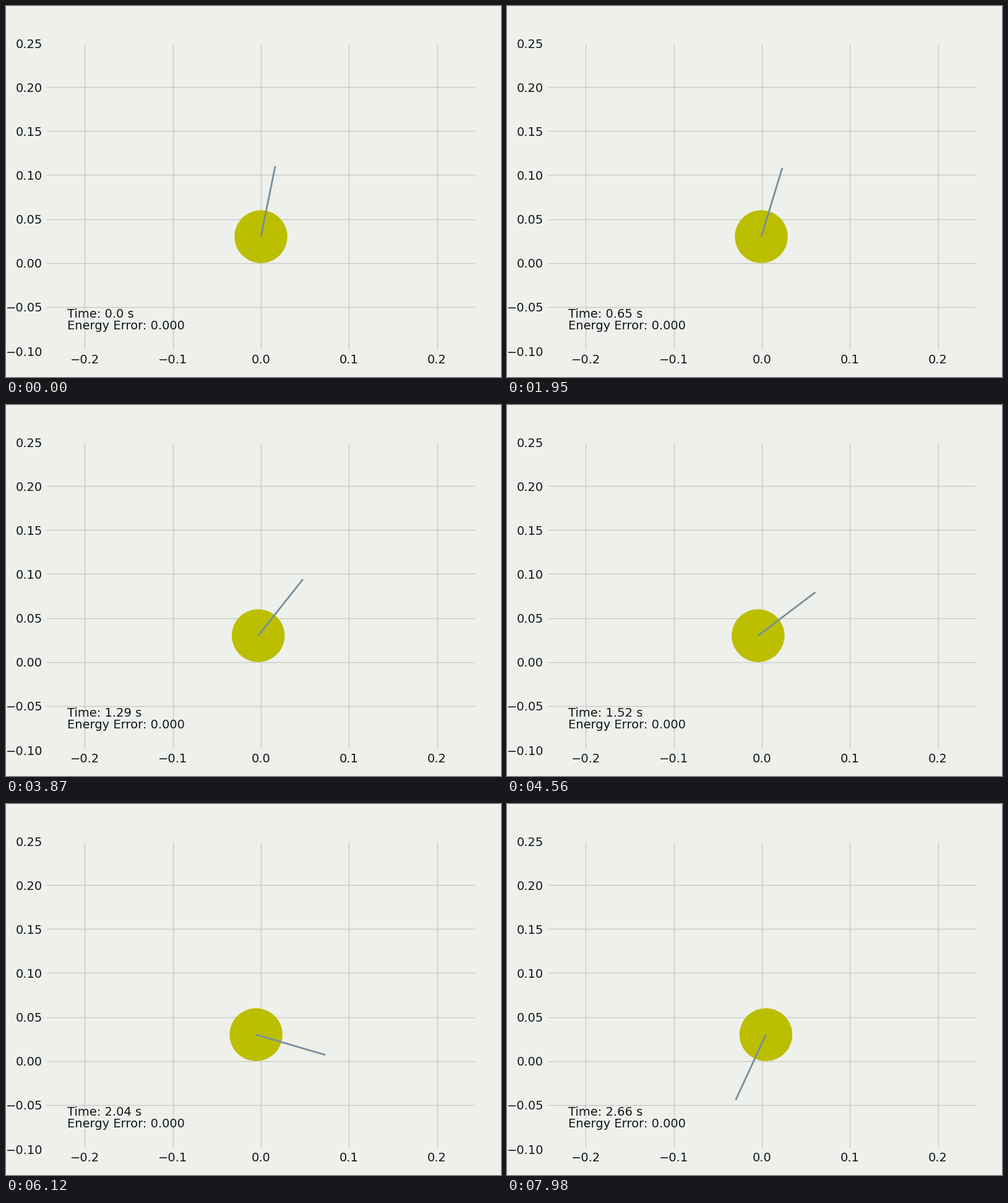
Write a matplotlib script that moves like this. It is 800 by 600 pixels and loops after 8 s.

```python
import numpy as np
import matplotlib.pyplot as plt
from matplotlib.animation import FuncAnimation

FRAMES = 267
LOOP_MS = 8000
DT = 0.01            # simulated seconds per frame
RADIUS = 0.03        # wheel radius
ROD = 0.0818         # rod length
RECOIL = 0.0073      # how far the wheel shifts against the rod
RATE = 1.478         # natural frequency of the rod, 1/s
START = 0.2          # initial tilt from vertical, rad

BG = '#eef0eb'
GRID = '#c8cac4'
INK = '#0f1519'
WHEEL = '#bcbe00'
STICK = '#778f9b'


def accel(angle):
    return RATE ** 2 * np.sin(angle)


def simulate(steps):
    """Angles of the falling rod, released at rest (velocity Verlet)."""
    sub = 10
    h = DT / sub
    angle, speed = START, 0.0
    angles = [angle]
    for _ in range(steps - 1):
        for _ in range(sub):
            speed += accel(angle) * h / 2
            angle += speed * h
            speed += accel(angle) * h / 2
        angles.append(angle)
    return np.array(angles)


angles = simulate(FRAMES)

plt.rcParams['font.family'] = 'DejaVu Sans'
plt.rcParams['font.size'] = 14

fig = plt.figure(figsize=(8, 6), dpi=100, facecolor=BG)
ax = fig.add_axes([0.08, 0.07, 0.87, 0.83], facecolor=BG)
half = 0.35 * 696 / 498 / 2
ax.set_xlim(-half, half)
ax.set_ylim(-0.10, 0.25)
ax.set_xticks(np.arange(-2, 3) / 10)
ax.set_yticks(np.arange(-2, 6) / 20)
ax.xaxis.set_major_formatter('{x:.1f}')
ax.yaxis.set_major_formatter('{x:.2f}')
ax.set_axisbelow(True)
ax.grid(True, color=GRID, linewidth=1)
ax.tick_params(length=0, pad=3.5, labelsize=14, labelcolor=INK)
for spine in ax.spines.values():
    spine.set_color(BG)
    spine.set_linewidth(3)

wheel = plt.Circle((0, RADIUS), RADIUS, facecolor=WHEEL, edgecolor='none')
ax.add_patch(wheel)
rod, = ax.plot([], [], color=STICK, linewidth=2, solid_capstyle='butt')
clock = ax.text(0.05, 54 / 498, '', color=INK, transform=ax.transAxes)
ax.text(0.05, 35 / 498, 'Energy Error: 0.000', color=INK,
        transform=ax.transAxes)


def draw(i):
    angle = angles[max(i - 1, 0)]    # the picture lags the clock by a step
    x = -RECOIL * (np.sin(angle) - np.sin(START))
    wheel.center = (x, RADIUS)
    rod.set_data([x, x + ROD * np.sin(angle)],
                 [RADIUS, RADIUS + ROD * np.cos(angle)])
    clock.set_text(f'Time: {round(i * DT, 2)} s')
    return wheel, rod, clock


anim = FuncAnimation(fig, draw, frames=FRAMES, interval=LOOP_MS / FRAMES,
                     repeat=True, repeat_delay=0, blit=False)
plt.show()
```
